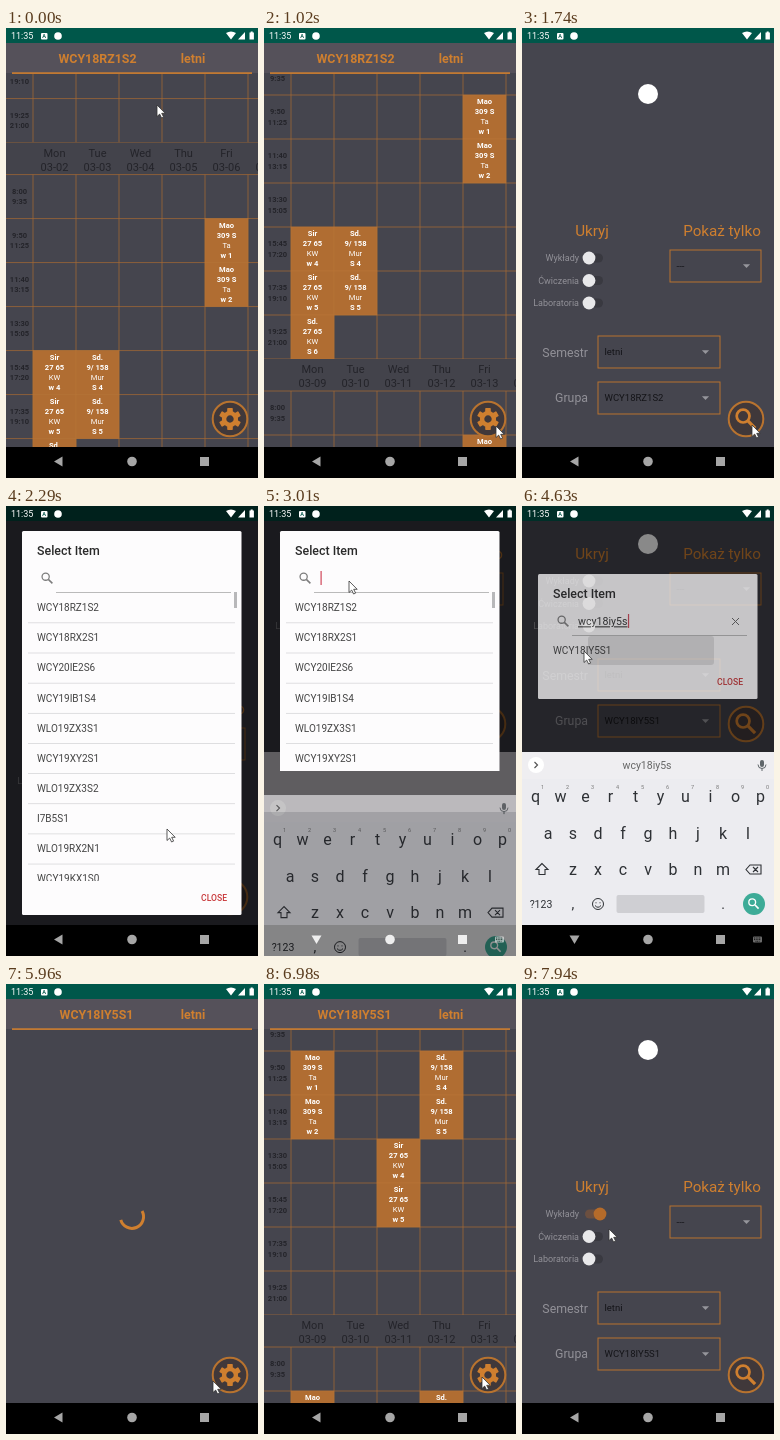
Recreate the animation shown at these times as an HTML page. Size 252 by 450 pixels, loop 8000 ms.

```html
<!DOCTYPE html>
<html lang="pl">
<head>
<meta charset="utf-8">
<title>Timetable app</title>
<style>
html, body { margin: 0; width: 100%; height: 100%; overflow: hidden; background: #000; }
svg { display: block; width: 100vw; height: 100vh; font-family: Roboto, sans-serif; }
text { white-space: pre; }
</style>
</head>
<body>
<svg viewBox="0 0 252 450">
  <defs>
    <clipPath id="body"><rect y="46" width="252" height="373"/></clipPath>
    <clipPath id="screen"><rect y="15" width="252" height="404"/></clipPath>
    <clipPath id="card"><rect id="cardClip" x="10" y="15" width="232" height="404"/></clipPath>
    <clipPath id="list"><rect id="listClip" x="16" width="220"/></clipPath>
  </defs>
  <rect width="252" height="450"/>
  <rect y="15" width="252" height="404" fill="#45454e"/>
  <g id="plan"></g>
  <g clip-path="url(#screen)"><g id="settings"></g></g>
  <rect width="252" height="15" fill="#00574a"/>
  <rect id="dim" width="252" height="419"/>
  <g id="status"></g>
  <rect id="shade" y="246" width="252" height="60" fill="#5f5d60"/>
  <g clip-path="url(#card)"><g id="dialog"></g></g>
  <g id="keys"></g>
  <rect id="band" y="419" width="252" height="31" opacity=".12"/>
  <g id="nav"></g>
  <path id="cursor" d="M0 0V11.5L2.7 9.1L4.6 13L6.6 12.1L4.7 8.3H8.2Z" fill="#fff" stroke="#333" stroke-width=".8"/>
</svg>
<script>
const LOOP = 8000;
const ORANGE = '#cf7f2f', LINE = '#a96b33', CELL = '#b06d32', INK = '#24242a', PAGE = '#45454e';
const $ = id => document.getElementById(id);
const set = (id, attrs) => { for (const k in attrs) $(id).setAttribute(k, attrs[k]); };
const clamp = v => Math.min(1, Math.max(0, v));
const ramp = (t, a, b) => clamp((t - a) / (b - a));
const smooth = p => p * p * (3 - 2 * p);
const easeOut = p => 1 - (1 - p) ** 3;

const text = (x, y, s, size, fill, more = '') =>
  `<text x="${x}" y="${y + size * .36}" font-size="${size}" fill="${fill}" ${more}>${s}</text>`;
const MID = 'text-anchor="middle"', END = 'text-anchor="end"', BOLD = ' font-weight="700"';
const rect = (x, y, w, h, fill, more = '') =>
  `<rect x="${x}" y="${y}" width="${w}" height="${h}" fill="${fill}" ${more}/>`;
const circle = (x, y, r, fill, more = '') => `<circle cx="${x}" cy="${y}" r="${r}" fill="${fill}" ${more}/>`;
const path = (d, fill, more = '') => `<path d="${d}" fill="${fill}" ${more}/>`;
const stroke = (c, w) => `stroke="${c}" stroke-width="${w}"`;
const lens = (x, y, s, c, w) => `<g transform="translate(${x} ${y}) scale(${s})">`
  + circle(-1.5, -1.5, 4, 'none', stroke(c, w)) + path('M1.5 1.5L6 6', 'none', stroke(c, w * 1.2)) + '</g>';

// Timetable
const HOURS = ['8:00 9:35', '9:50 11:25', '11:40 13:15', '13:30 15:05', '15:45 17:20', '17:35 19:10', '19:25 21:00'];
const DAYS = ['Mon', 'Tue', 'Wed', 'Thu', 'Fri', 'Sat'];
const ROW = 44, COL = 43, LEFT = 27, HEAD = 32, WEEK = HEAD + 7 * ROW;
const LESSONS = [
  [[4, 1, 'Mao|309 S|Ta|w 1'], [4, 2, 'Mao|309 S|Ta|w 2'], [0, 4, 'Sir|27 65|KW|w 4'], [0, 5, 'Sir|27 65|KW|w 5'],
    [0, 6, 'Sd.|27 65|KW|S 6'], [1, 4, 'Sd.|9/ 158|Mur|S 4'], [1, 5, 'Sd.|9/ 158|Mur|S 5']],
  [[0, 1, 'Mao|309 S|Ta|w 1'], [0, 2, 'Mao|309 S|Ta|w 2'], [2, 3, 'Sir|27 65|KW|w 4'], [2, 4, 'Sir|27 65|KW|w 5'],
    [3, 1, 'Sd.|9/ 158|Mur|S 4'], [3, 2, 'Sd.|9/ 158|Mur|S 5']]
];
const pad = n => String(n).padStart(2, '0');

function week(n, lessons) {
  const y = 115 + n * WEEK, top = y + HEAD;
  let s = rect(0, y, 252, HEAD, '#43434b');
  DAYS.forEach((d, i) => {
    const date = new Date(2020, 2, 2 + n * 7 + i), x = LEFT + COL * (i + .5);
    s += text(x, y + 10, d, 11, INK, MID)
      + text(x, y + 24, `${pad(date.getMonth() + 1)}-${pad(date.getDate())}`, 11, INK, MID);
  });
  HOURS.forEach((h, r) => h.split(' ').forEach((v, i) => {
    s += text(13.5, top + r * ROW + 16.7 + i * 10.3, v, 7.5, INK, MID + BOLD);
  }));
  let d = '';
  for (let r = 0; r < 8; r++) d += `M0 ${top + r * ROW}H252`;
  for (let c = 0; c < 6; c++) d += `M${LEFT + c * COL} ${top}V${top + 7 * ROW}`;
  s += path(d, 'none', stroke(LINE, .7));
  if (n >= 0) for (const [c, r, body] of lessons) {
    const x = LEFT + c * COL, cy = top + r * ROW;
    s += rect(x, cy, COL, ROW, CELL, stroke('#bb7838', .4));
    body.split('|').forEach((v, i) => {
      s += text(x + COL / 2, cy + 6.5 + i * 10, v, 7.6, '#fff', MID + (i === 2 ? '' : BOLD));
    });
  }
  return s;
}
const table = k => [-1, 0, 1, 2].map(n => week(n, LESSONS[k])).join('');

let gear = circle(0, 0, 5.9, 'none', stroke(ORANGE, 4.4));
for (let a = 0; a < 360; a += 60) gear += rect(-2.8, -11, 5.6, 5, ORANGE, `rx=".8" transform="rotate(${a})"`);
const round = circle(0, 0, 17.3, '#40383a', stroke('#b8732f', 2));

$('plan').innerHTML = `<g clip-path="url(#body)"><g id="table0">${table(0)}</g><g id="table1">${table(1)}</g></g>`
  + rect(0, 15, 252, 30, '#55515a') + rect(6, 44.3, 240, 1.6, ORANGE)
  + text(91.5, 31, '', 12.4, ORANGE, MID + BOLD + ' id="group"')
  + text(187, 31, 'letni', 12.4, ORANGE, MID + BOLD)
  + path('M10 -6A11.6 11.6 0 1 1 -11.2 3', 'none', stroke(ORANGE, 3) + ' id="loader"')
  + `<g transform="translate(224 391)">${round}${gear}</g>`;

// Settings
const arrow = (x, y) => path(`M${x - 3.6} ${y - 1.7}h7.2l-3.6 3.6z`, '#96969c');
const spinner = (x, y, w, s, id) => rect(x, y, w, 32, 'none', stroke('#b8732f', 1))
  + text(x + 6.5, y + 16, s, 9.5, '#141418', `id="${id}"`) + arrow(x + w - 14.5, y + 16);
const toggle = (y, s, id) => text(57, y, s, 9, '#929198', END)
  + rect(63, y - 4.5, 18, 9, '#393940', `rx="4.5" id="${id}Track"`) + circle(67, y, 6.4, '#e8e8ea', `id="${id}"`);
$('settings').innerHTML = rect(0, 15, 252, 404, PAGE)
  + `<g id="badge">${circle(126, 66, 10, '#fff')}</g><g id="form">`
  + text(70, 203, 'Ukryj', 15.2, ORANGE, MID) + text(200, 203, 'Pokaż tylko', 15.2, ORANGE, MID)
  + toggle(230, 'Wykłady', 'sw1') + toggle(252.5, 'Ćwiczenia', 'sw2') + toggle(275, 'Laboratoria', 'sw3')
  + spinner(148, 222, 91, '---', 'only') + text(66, 325, 'Semestr', 12.3, '#929198', END)
  + spinner(76, 308, 122, 'letni', 'term') + text(66, 370, 'Grupa', 12.3, '#929198', END)
  + spinner(76, 354, 122, '', 'pick') + `</g><g id="find"><g transform="translate(224 391)">${round}</g>`
  + lens(223.5, 390.5, 1.6, ORANGE, 1.7) + '</g>';

// System bars
$('status').innerHTML = text(5, 8, '11:35', 9, '#fff')
  + rect(35, 5, 6.5, 6.5, '#fff', 'rx="1"') + text(38.2, 8.3, 'A', 5.5, '#00574a', MID + BOLD)
  + circle(52, 8, 3.8, '#fff')
  + path('M220 5Q225 2 230 5L225 11.5ZM232 11.5L239 4V11.5ZM243.5 4.5h1.2v-1h2v1h1.2v7h-4.4Z', '#fff');
$('nav').innerHTML = path('M56.5 428.5V438.5L48 433.5Z', 'inherit', 'id="back"')
  + circle(126, 433.5, 4.8, 'inherit') + rect(194, 429, 9, 9, 'inherit')
  + `<g id="imeIcon" opacity=".65">${rect(231, 430.5, 9, 6, 'inherit', 'rx="1"')}`
  + path('M232 432h7M232 433.6h7M233.5 435.3h4', 'none', stroke('#000', .8) + ' stroke-dasharray="1 .7"') + '</g>';

// Keyboard
const KEY = '#2e3135';
const keyRow = (s, x, y) => [...s].map((c, i) => text(x + i * 25, y, c, 16, KEY, MID)).join('');
$('keys').innerHTML = rect(0, 246, 252, 204, '#ececf0') + rect(0, 246, 252, 27, '#efeef1')
  + circle(14, 259, 8, '#fff') + path('M12.5 256l3 3l-3 3', 'none', stroke('#555', 1.2))
  + text(125, 259, '', 10.5, '#666', MID + ' id="hint"')
  + rect(238, 254, 4, 7, '#60666a', 'rx="2"') + path('M236 258.5a4 4 0 0 0 8 0M240 262.5v2.5', 'none', stroke('#60666a', 1))
  + keyRow('qwertyuiop', 13.5, 290) + keyRow('asdfghjkl', 26, 327) + keyRow('zxcvbnm', 51, 363)
  + [...'1234567890'].map((c, i) => text(20.5 + i * 25, 281, c, 5.5, '#777', MID)).join('')
  + path('M20 357.5l-6 6h3v5h6v-5h3z', 'none', stroke(KEY, 1.1))
  + path('M224 363.5l4-4.5h11v9h-11zM231 361l5 5M236 361l-5 5', 'none', stroke(KEY, 1.1))
  + text(19, 398, '?123', 10.5, KEY, MID) + text(51, 398, ',', 14, KEY, MID) + text(201, 398, '.', 14, KEY, MID)
  + circle(76, 398, 5.5, 'none', stroke(KEY, 1)) + path('M73 399.5q3 3.5 6 0M74 396.3v1M78 396.3v1', 'none', stroke(KEY, 1))
  + rect(94.5, 389, 88, 18, '#cfcfd3', 'rx="2"') + circle(232, 398, 11, '#3dab97') + lens(231.5, 397.5, .85, '#fff', 1.6);

// Group picker
const GROUPS = ('WCY18RZ1S2 WCY18RX2S1 WCY20IE2S6 WCY19IB1S4 WLO19ZX3S1 WCY19XY2S1 WLO19ZX3S2 I7B5S1 '
  + 'WLO19RX2N1 WCY19KX1S0 WCY18IY5S1 WCY18IY3S1 WCY18IB2S1').split(' ');
const QUERY = 'wcy18iy5s';
const matches = q => GROUPS.filter(g => g.toLowerCase().startsWith(q));
let shown = '';
function drawDialog(q, top, bottom) {
  const key = [q, top, bottom].join();
  if (key === shown) return;
  shown = key;
  const end = bottom - 34;
  const hits = matches(q);
  let items = '';
  hits.forEach((g, i) => {
    const y = top + 76.5 + i * 30.15;
    items += text(31, y, g, 10, '#444');
    if (i < hits.length - 1) items += rect(22, y + 15, 207, .7, '#d2d2d4');
  });
  set('listClip', { y: top + 61, height: end - top - 61 });
  $('dialog').innerHTML = rect(16, top, 219.5, bottom - top, '#fdfcfd', 'rx="1.5"')
    + text(31, top + 19.5, 'Select Item', 12.4, '#2a2a2a', 'font-weight="500"')
    + lens(41, top + 47, .9, '#7c7c7c', 1.4) + rect(50, top + 61, 175, .8, '#aaa')
    + text(56, top + 47.5, q, 10.6, '#333', 'id="query" text-decoration="underline"')
    + rect(56, top + 40, 1.2, 14, '#d0485a', 'id="caret"')
    + (q ? path(`M210 ${top + 44}l7 7m0 -7l-7 7`, 'none', stroke('#666', 1)) : '')
    + `<g clip-path="url(#list)">${items}</g>`
    + (hits.length > 4 ? rect(228, top + 61, 3, 16, '#b8b8ba') : '')
    + rect(66, top + 62, 126, 29, '#000', 'rx="3" id="press"')
    + text(221, bottom - 16.8, 'CLOSE', 8.6, '#c8383a', END + ' font-weight="500"');
  set('caret', { x: 56.5 + (q ? $('query').getComputedTextLength() : 0) });
}

// Pointer: time, x, y
const MOVES = [[0, 151, 77], [420, 151, 77], [1020, 232, 398], [1740, 230, 397], [1920, 165, 366], [2170, 165, 366],
  [2290, 161, 323], [2650, 85, 75], [4150, 85, 75], [4440, 62, 145], [4760, 62, 145], [5420, 218, 391],
  [5700, 218, 391], [5900, 207, 397], [6860, 207, 397], [6960, 218, 393], [7260, 218, 393], [7680, 87, 245], [8000, 87, 245]];
function pointer(t) {
  const i = Math.max(1, MOVES.findIndex(m => m[0] > t)), a = MOVES[i - 1], b = MOVES[i];
  const p = smooth(ramp(t, a[0], b[0]));
  return [a[1] + (b[1] - a[1]) * p, a[2] + (b[2] - a[2]) * p];
}
const show = (id, on) => set(id, { visibility: on ? 'visible' : 'hidden' });
const shift = (id, y) => set(id, { transform: `translate(0 ${y})` });

function draw(t) {
  const second = t > 4500, name = second ? 'WCY18IY5S1' : 'WCY18RZ1S2';
  $('group').textContent = $('pick').textContent = name;
  set('group', { x: second ? 90.5 : 91.5 });
  show('table0', !second);
  show('table1', t > 6150);
  shift('table0', -124 * easeOut(ramp(t, 0, 880)));
  shift('table1', -124 * easeOut(ramp(t, 6200, 6620)));
  show('loader', second && t < 6150);
  set('loader', { transform: `translate(126 233) rotate(${(t - 5960) * .45})` });

  const open = t < 5000 ? ramp(t, 1180, 1420) : t < 6900 ? 1 - ramp(t, 5520, 5740) : ramp(t, 7000, 7240);
  set('settings', { opacity: smooth(open) });
  shift('settings', 30 * (1 - easeOut(open)));
  const small = t >= 2980 && t < 4800;
  shift('badge', small ? -28 : 0);
  shift('form', small ? -155 : 0);
  shift('find', small ? -173 : 0);
  const on = smooth(ramp(t, 7790, 7910));
  set('sw1', { cx: 67 + 11 * on, fill: on > .4 ? '#b56b2a' : '#e8e8ea' });
  set('sw1Track', { fill: on > .4 ? '#6b4f40' : '#393940' });

  const fade = ramp(t, 2150, 2270) * (1 - ramp(t, 4580, 4780));
  set('dim', { opacity: .62 * fade });
  const typed = t < 3610 ? 0 : Math.min(9, Math.floor((t - 3610) / 87) + 1);
  const q = QUERY.slice(0, typed);
  const h = t < 3090 ? 384 : Math.min(211, 95 + 30 * matches(q).length);
  const top = t < 3090 ? 25 : 130.5 - h / 2;
  drawDialog(q, top, top + h);
  set('dialog', { opacity: fade });
  set('cardClip', { height: t >= 2980 && t < 3090 ? 250 : 404 });
  show('caret', t > 2800 && (typed > 0 || (t - 2800) % 1000 < 500));
  set('press', { opacity: .11 * ramp(t, 4450, 4560) });

  const k = ramp(t, 2960, 3060) * (1 - ramp(t, 4780, 4920));
  const sliding = k > 0 && k < 1;
  // The sheet stops at the navigation bar once it has settled.
  set('keys', { opacity: Math.min(1, k * 1.25), 'clip-path': sliding ? 'none' : 'url(#screen)' });
  shift('keys', 88 * (1 - k));
  show('shade', sliding);
  show('band', sliding);
  set('nav', { fill: sliding ? '#eee' : '#a6a6a6' });
  $('hint').textContent = q;
  set('back', { transform: k > 0 ? 'rotate(-90 52.5 433.5)' : '' });
  show('imeIcon', k > 0);

  set('cursor', { transform: `translate(${pointer(t)})` });
}
function frame(now) {
  draw(now % LOOP);
  requestAnimationFrame(frame);
}
draw(0);
requestAnimationFrame(frame);
</script>
</body>
</html>
```
